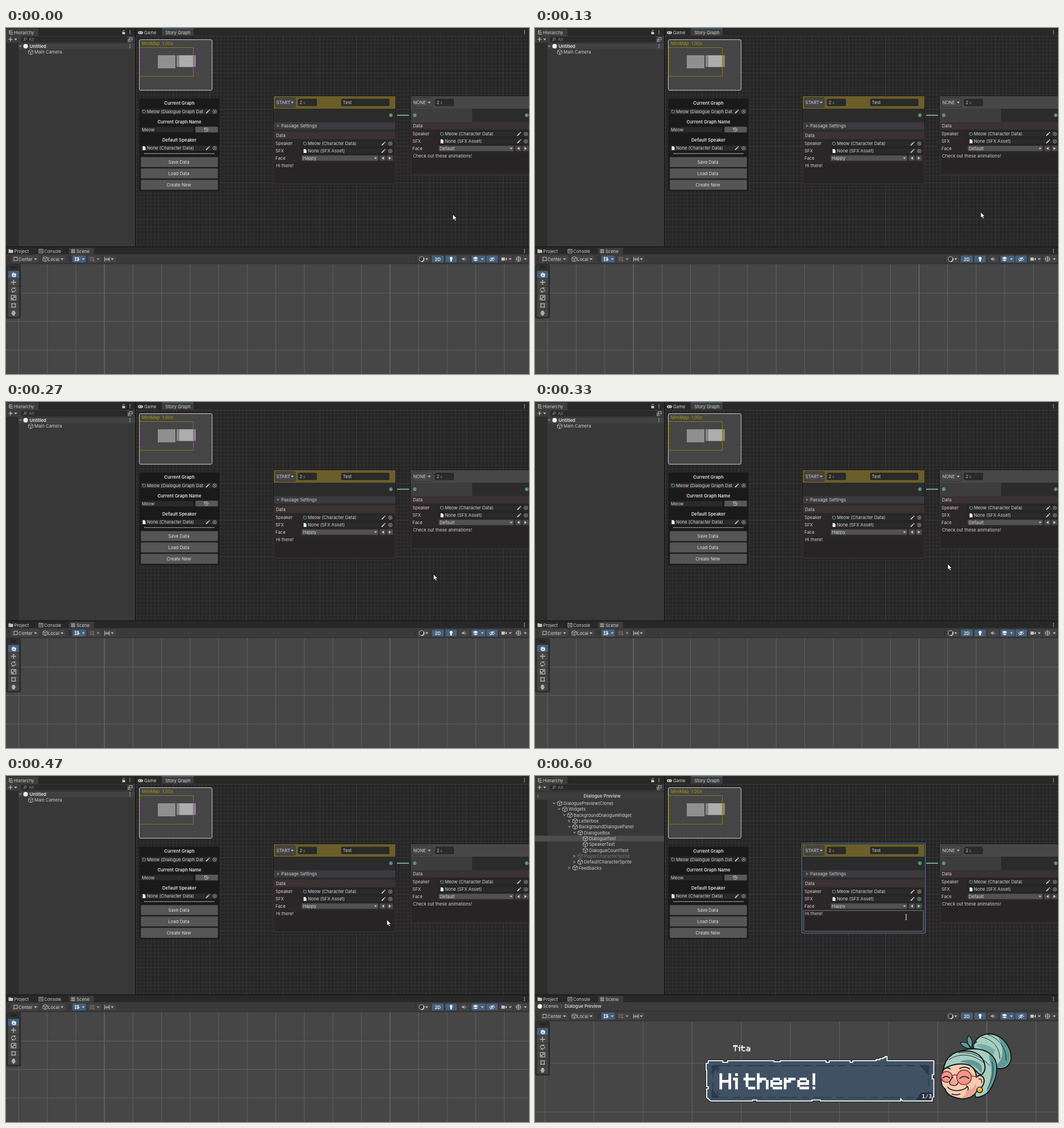
Recreate the animation shown at these times as an HTML page. Size 920 px wide and 609 px high, loop 1470 ms.

```html
<!DOCTYPE html>
<html lang="en">
<head>
<meta charset="utf-8">
<title>Dialogue editor</title>
<style>
html, body { margin: 0; width: 100%; height: 100%; overflow: hidden; background: #191919; }
svg { display: block; width: 100%; height: 100%; font: 7.75px Inter, sans-serif; }
text { white-space: pre; }
</style>
</head>
<body>
<svg id="stage" viewBox="0 0 920 609" xmlns="http://www.w3.org/2000/svg"></svg>
<script>
const INK = '#d0d0d0', BLUE = '#46607c', FIELD = '#2a2a2a', TEAL = '#84e4c8';

const rect = (x, y, w, h, fill, extra = '') =>
  `<rect x="${x}" y="${y}" width="${w}" height="${h}" fill="${fill}" ${extra}/>`;
const path = (d, stroke = INK, w = 1, fill = 'none', extra = '') =>
  `<path d="${d}" stroke="${stroke}" stroke-width="${w}" fill="${fill}" ${extra}/>`;
const dot = (x, y, r, fill, stroke = 'none', w = 1) =>
  `<circle cx="${x}" cy="${y}" r="${r}" fill="${fill}" stroke="${stroke}" stroke-width="${w}"/>`;
const text = (x, y, s, extra = '', fill = INK) =>
  `<text x="${x}" y="${y + 2.8}" fill="${fill}" ${extra}>${s}</text>`;
const group = (id, body, extra = '') => `<g id="${id}" ${extra}>${body}</g>`;
const range = (n, f) => Array.from({ length: n }, (_, i) => f(i)).join('');
const BOLD = 'font-weight="600"', MID = 'text-anchor="middle"';

// Small interface icons
const caret = (x, y, c = '#c4c4c4') => path(`M${x - 2.6} ${y - 1.3}h5.2l-2.6 3z`, 'none', 0, c);
const arrow = (x, y, dir = 1, c = '#c4c4c4') => path(`M${x - 2 * dir} ${y - 2.8}v5.6l${4.2 * dir} -2.8z`, 'none', 0, c);
const kebab = (x, y) => range(3, i => dot(x, y - 2.6 + i * 2.6, .8, '#c4c4c4'));
const cube = (x, y, c = '#c8c8c8') =>
  path(`M${x} ${y - 4.3}l4 2v4.6l-4 2l-4 -2v-4.6zM${x - 4} ${y - 2.3}l4 2l4 -2M${x} ${y - .3}v4.6`, c, .8);
const pencil = (x, y) => path(`M${x - 2.6} ${y + 2.6}l4 -4`, INK, 1.8) +
  path(`M${x + 2} ${y - 2}l1 -1`, INK, 2) + path(`M${x - 3.6} ${y + 3.6}l.6 -2l1.4 1.4z`, 'none', 0, INK);
const picker = (x, y) => dot(x, y, 3, 'none', '#bbb', .8) + dot(x, y, 1.1, '#bbb');
const page = (x, y) => path(`M${x - 2.5} ${y - 3.5}h3l2 2v5h-5z`, 'none', 0, '#eee');
const asset = (x, y) => path(`M${x - 2.6} ${y - 1.5}l2.6 -1.3l2.6 1.3v3l-2.6 1.4l-2.6 -1.4z`, '#4d9fc0', 1) +
  dot(x - 2.3, y - 2, .9, '#d06a50');
const port = (x, y) => dot(x, y, 2.6, '#1d2d29', TEAL, .9) + dot(x, y, 1.2, TEAL);
const button = (x, y, w, h, fill = '#585858') =>
  rect(x, y, w, h, fill, 'rx="1.5" stroke="#262626" stroke-width=".6"');
const field = (x, y, w, h) => rect(x, y, w, h, FIELD, 'rx="1.5" stroke="#1a1a1a" stroke-width=".6"');

function objectField(x, y, w, s, icon) {
  return field(x, y - 5, w, 10) + icon(x + 6, y) + text(x + 11, y, s) +
    pencil(x + w - 18, y) + picker(x + w - 6, y);
}

function hierarchy() {
  const base = rect(0, 0, 227, 385, '#383838') + rect(0, 27, 22, 358, '#2d2d2d') +
    rect(0, 0, 227, 14, '#282828') + rect(0, 1, 57, 13, '#3c3c3c') + rect(0, 14, 227, 12.5, '#3c3c3c') +
    path('M0 26.8H227', '#252525', .7) +
    path('M5 5h6M7 8h5M7 11h5M6 5v6', INK, 1) + text(14, 8, 'Hierarchy') +
    rect(204.5, 7, 5, 4, '#c4c4c4') + path('M205.7 7V5.5a1.5 1.5 0 0 1 3 0', '#c4c4c4', .9) + kebab(218, 7.5) +
    path('M4.5 20h7M8 16.5v7', INK, 1.2) + caret(17, 20) +
    rect(27, 15.5, 186, 9, FIELD, 'rx="3" stroke="#202020" stroke-width=".6"') +
    dot(34, 19.3, 2, 'none', '#aaa', .8) + path('M32.5 21l-2 2', '#aaa', .9) + text(40, 20, 'All', '', '#858585') +
    rect(217, 17, 5, 4, 'none', 'stroke="#c4c4c4" stroke-width=".8"') +
    path('M215 19v5h5M218 19.5l-2 3', '#c4c4c4', .8);

  const idle = rect(22, 27, 205, 10.5, '#414141') + caret(25, 32, '#8a8a8a') + dot(34.5, 32, 4, '#eeeeee') +
    text(41.5, 32, 'Untitled', BOLD, '#e4e4e4') + kebab(218, 32) + cube(43.5, 42.6) + text(50, 42.6, 'Main Camera');

  // depth, state (v open, > closed, - leaf), label
  const rows = [
    [0, 'v', 'DialoguePreview(Clone)'], [1, 'v', 'Widgets'], [2, 'v', 'BackgroundDialogueWidget'],
    [3, '>', 'Letterbox'], [3, 'v', 'BackgroundDialoguePanel'], [4, 'v', 'DialogueBox'],
    [5, '-', 'DialogueText'], [5, '-', 'SpeakerText'], [5, '-', 'DialogueCountText'],
    [4, '>', 'PlayerCharacterSprite'], [4, '>', 'DefaultCharacterSprite'], [3, '>', 'Feedbacks']
  ];
  const tree = rect(0, 27, 227, 16, '#383838') + rect(0, 29.5, 227, 12, '#3c3c3c') + rect(0, 42, 22, 10, '#2d2d2d') +
    path('M7 33l-3 2.5l3 2.5', '#aaa', .9) + text(118, 35.5, 'Dialogue Preview', `${BOLD} ${MID}`) +
    rect(0, 105, 227, 10.3, '#4d4d4d') +
    rows.map(([d, state, label], i) => {
      const x = 50 + d * 9, y = 48.2 + i * 10.32, c = label.startsWith('Player') ? '#777' : INK;
      const mark = state === 'v' ? caret(x - 16.5, y, '#8a8a8a') : state === '>' ? arrow(x - 16.5, y, 1, '#777') : '';
      return mark + cube(x - 6.5, y, c) + text(x, y, label, '', c);
    }).join('');
  return base + group('idleTree', idle) + group('openTree', tree);
}

function miniMap() {
  return rect(234.5, 20.5, 128, 89, '#4a4a4a', 'rx="2.5" fill-opacity=".85" stroke="#c8c8c8" stroke-width="1"') +
    text(239, 27.5, 'MiniMap  1.00x', '', '#a39c10') +
    rect(267, 48, 31, 23, '#8f8f8f') + rect(300, 48, 34, 20.5, '#858585') + rect(305, 48, 24.5, 20.5, '#adadad') +
    rect(235, 34.5, 94.5, 50.5, 'none', 'stroke="#858212" stroke-width=".9"');
}

function graphPanel() {
  const big = (y, s) => button(237, y, 136, 18, '#555') + text(304, y + 9, s, MID, '#e0e0e0');
  const head = (y, s) => text(305, y, s, `${BOLD} ${MID}`, '#e0e0e0');
  return rect(234.5, 124, 141, 163, '#1a1a1a', 'rx="2"') + head(132.5, 'Current Graph') +
    objectField(237, 147, 136, 'Meow (Dialogue Graph Dat', asset) + head(165, 'Current Graph Name') +
    field(237, 174, 93, 10) + text(239, 179, 'Meow') + button(333, 173.5, 40, 10.5) +
    path('M349.5 177a3.3 3.3 0 1 1 -.4 3M349 175.5v2.5h2.5M352.5 177v2.3h1.8', INK, .9) +
    head(197.5, 'Default Speaker') + objectField(237, 211.5, 136, 'None (Character Data)', page) +
    path('M243 221H367', '#ddd', 1, 'none', 'stroke-dasharray="2.2 .6"') +
    big(227, 'Save Data') + big(247, 'Load Data') + big(267, 'Create New');
}

function dataBox(x, y, w, face, line) {
  const fx = x + 49, end = x + w;
  return rect(x, y, w, 92, '#2b2728', 'stroke="#48393b" stroke-width=".8"') +
    rect(x + .5, y + .5, w - 1, 12, '#3b3234') + text(x + 4, y + 6.5, 'Data') +
    text(x + 3, y + 20.5, 'Speaker') + objectField(fx, y + 20.5, w - 52, 'Meow (Character Data)', asset) +
    text(x + 3, y + 33.5, 'SFX') + objectField(fx, y + 33.5, w - 52, 'None (SFX Asset)', page) +
    text(x + 3, y + 46.5, 'Face') + button(fx, y + 41, w - 79, 10, '#515151') + text(fx + 2, y + 46, face) +
    caret(end - 35, y + 46) + button(end - 28, y + 41, 11.5, 10, '#484848') + button(end - 15.5, y + 41, 11.5, 10, '#484848') +
    arrow(end - 22, y + 46, -1) + arrow(end - 9.5, y + 46) +
    rect(x + 2, y + 54, w - 4, 36, '#272425') + text(x + 4, y + 59.5, line);
}

function nodes() {
  const title = (x, kind) => button(x + 3, 122.5, 35, 17, '#464646') + text(x + 4.5, 131, kind) + caret(x + 32.5, 131) +
    field(x + 43, 125, 32.5, 12) + text(x + 45.5, 131, '2') + text(x + 52, 131, 's', 'font-size="6.5"', '#8a8a8a');
  return group('start',
    rect(470.5, 119.5, 215, 157, '#2b2b2b', 'rx="2" stroke="#1c1c1c"') + rect(471, 120, 214, 22, '#6a5e2b') +
    title(471, 'START') + field(590, 125, 84, 12) + text(592.5, 131, 'Test') + port(677, 153.5) +
    rect(471, 166, 214, 12.5, '#3d3a3f') + arrow(479, 172, 1, '#777') + text(484, 172, 'Passage Settings') +
    dataBox(471, 183, 214, 'Happy', 'Hi there!')) +
    rect(711.5, 119.5, 213, 139, '#2b2b2b', 'rx="2" stroke="#1c1c1c"') + rect(712, 120, 212, 22, '#474747') +
    rect(712, 142, 108, 24, '#3d3d3d') + title(712, 'NONE') + port(719, 153.5) + port(916, 153.5) +
    dataBox(712, 166, 211.5, 'Default', 'Check out these animations!') +
    path('M688 153.5H709', '#a5e6d6', 1.3) +
    group('focus',
      rect(469.5, 118.3, 217, 158.4, 'none', 'rx="3" stroke="#457f9f" stroke-width="1.1"') +
      rect(472.8, 236.8, 210.4, 36.4, 'none', 'rx="1.5" stroke="#858585" stroke-width=".9"'));
}

function graph() {
  return rect(229, 0, 691, 14, '#282828') + rect(229, 13, 691, 372, '#262626') +
    rect(229, 13, 691, 372, 'url(#fine)') + rect(229, 13, 691, 372, 'url(#coarse)') +
    rect(274, 0, 56, 13, '#3f3f3f') + rect(274, 0, 56, .9, '#3a6a95') +
    rect(232, 5.8, 9, 5, '#c8c8c8', 'rx="2.4"') + path('M233.5 8.3h2.6M234.8 7v2.6', '#333', .7) +
    dot(238.5, 8.3, .8, '#333') + text(243, 8, 'Game') + text(280.5, 8, 'Story Graph') + kebab(912, 7.5) +
    miniMap() + graphPanel() + nodes();
}

// Pixel lettering as strokes on a unit grid: [advance, path]
const GLYPHS = {
  H: [6, 'M0 0V6M4 0V6M0 3H4'], T: [6, 'M0 1V0H4V1M2 0V6'], '!': [2, 'M.8 0V4M.8 6v.01'],
  i: [3, 'M1 0v.01M0 2H1V6'], t: [6, 'M0 2H4M1 0V5M2 6H4'], h: [6, 'M0 0V6M0 3H1M1 2H3M4 3V6'],
  e: [6, 'M1 2H3M0 3V5M4 3V4H0M1 6H4'], r: [6, 'M0 2V6M1 3H2M2 2H4'],
  a: [6, 'M1 2H3M4 3V6M1 4H4M0 5v.01M1 6H4'], ' ': [1.7, '']
};
function pixelText(x, y, unit, s) {
  let at = 0;
  const body = [...s].map(c => {
    const [adv, d] = GLYPHS[c], g = `<path d="${d}" transform="translate(${at})"/>`;
    at += adv;
    return g;
  }).join('');
  return `<g role="img" aria-label="${s}" fill="none" stroke="#fff" stroke-width="1.2" stroke-linecap="square"
    transform="translate(${x + unit / 2} ${y + unit / 2}) scale(${unit})">${body}</g>`;
}

function speechBox() {
  const edge = 'M290 492H318v3h9v-3H416v2h12v-2H516v3h6v-3H562v3h5v-3H612v-2h7v-2h6v-2h4v-2h4v8H722.5V519h-3v8h3V562' +
    'h-3v7.5H663l-4 -4v4H505v-2h-16v2H383v-2h-8v2H295l-8 -7V546h3v-4h-3V510h-1V497h4z';
  return path(edge, '#11181f', 4, '#11181f') + path(edge, '#fff', 2, '#405163') +
    path('M299 501.5H712V562.5H299z', '#2a3948', 1.5, 'none', 'stroke-dasharray="34 7 16 9"') +
    path('M297 517V502H312zM697 502H712V519zM297 548V562H311z', '#263341', 1, '#2c3b4a') +
    path('M308 514V508h6M702 508h4v8M308 549v6h6', '#2a3948', 1.5) +
    path('M689 567l9 -14h22v9l-3 5z', 'none', 0, '#27323f') +
    pixelText(312, 516.5, 4.3, 'Hi there!') + pixelText(338, 462.5, 1.62, 'Tita') +
    text(699.5, 561, '1/3', 'style="font:bold 9.8px \'DejaVu Sans Mono\',monospace" letter-spacing=".7"', '#fff');
}

function portrait() {
  const line = '#0e171c', light = '#a6cdbf', dark = '#5d9a98', skin = '#f8cbb0';
  const shape = (d, fill, w = 2.2) => path(d, line, w, fill, 'stroke-linejoin="round" stroke-linecap="round"');
  const flat = (d, fill) => path(d, 'none', 0, fill);
  return shape('M798 468C799 449 816 439 834 441C858 445 873 471 870 491C866 507 850 511 838 504C832 484 820 474 798 468Z', light) +
    flat('M845 446C866 458 872 480 866 496C857 507 847 508 840 502C857 492 858 466 845 446Z', dark) +
    flat('M803 463C812 457 826 460 840 472C836 482 834 488 835 493C828 478 817 470 803 463Z', '#78aea6') +
    shape('M815 447C835 451 849 466 849 488M826 442C845 448 862 466 861 491', 'none', 1) +
    shape('M794 469C783 469 775 463 773 457C782 455 790 459 794 469C785 458 785 449 789 444C797 450 798 459 794 469C797 461 801 457 805 456', dark, 1.5) +
    shape('M752 496C757 478 777 469 800 469C827 470 843 485 843 505C843 523 838 534 831 546C825 557 812 563 802 562L798 512Z', light) +
    flat('M829 489C835 504 834 524 823 553C835 543 842 524 841 503C840 492 836 484 829 480Z', dark) +
    shape('M741 509C752 498 772 495 788 499C799 504 804 514 804 524C810 517 819 521 819 531C818 541 811 547 806 548C801 559 790 566 774 565C757 562 747 557 744 546C735 540 734 524 741 509Z', skin) +
    flat('M785 547C795 549 801 543 803 535L805 548C800 558 788 565 774 564C782 560 786 554 785 547Z', '#e8a68d') +
    shape('M741 509C743 494 751 482 765 476C790 469 812 476 819 495C823 508 819 515 814 519C806 519 804 508 790 500C773 496 754 499 741 509Z', light) +
    flat('M772 494C784 488 800 489 811 498C816 505 816 512 813 516C807 506 797 498 772 494Z', dark) +
    shape('M752 490C772 476 798 479 818 496M770 477C790 474 811 481 829 501M834 494C839 510 835 530 825 546', 'none', 1) +
    shape('M742 508C746 505 750 505 754 508M772 507C779 503 786 504 791 508', 'none', 1.9) +
    dot(747, 523, 10.5, '#f5958a', '#8e3439', 1.8) + dot(780.5, 524, 14, '#f5958a', '#8e3439', 1.8) +
    path('M758 521Q762 517 767 521M794 521L808 523', '#8e3439', 1.7) +
    shape('M740 525Q746 519 753 525M772 526Q780 519 790 526', 'none', 1.7) +
    shape('M759 523C752 532 750 537 757 539C762 541 768 539 769 534', '#f0a78e', 1.5) +
    shape('M749 543C756 551 774 552 786 543M785 540Q790 543 788 548M757 556Q765 559 773 556M809 527Q815 526 814 534', 'none', 1.6) +
    dot(810.5, 548, 5.5, '#f5a62b', line, 1.5) + dot(809, 546, 1.8, '#ffe08a');
}

function sceneGrid(x0, n, step, ys, bold) {
  const thin = 'vector-effect="non-scaling-stroke"';
  return range(n, i => path(`M${x0 + i * step} 400V640`, i % 10 === bold ? '#787878' : '#606060', 1, 'none', thin)) +
    ys.map(y => path(`M-60 ${y}H980`, '#606060', 1, 'none', thin)).join('');
}

function sceneBar() {
  const on = (x, w) => rect(x, 400.5, w, 12, BLUE, 'rx="1.5"');
  const off = (x, w) => rect(x, 400.5, w, 12, '#434343', 'rx="1.5"');
  const y = 406.7, hash = (x, c) => path(`M${x - 4} ${y - 2}h8M${x - 4} ${y + 2}h8M${x - 2} ${y - 4}v8M${x + 2} ${y - 4}v8`, c, .9);
  const tool = i => rect(3.5, 427.5 + i * 13.6, 19.5, 12.8, i ? '#454545' : BLUE, 'rx="1"');
  const mark = (i, d) => path(d, '#d0d0d0', 1, 'none', `transform="translate(13.3 ${433.9 + i * 13.6})"`);
  return rect(0, 398, 920, 17, '#3a3a3a') + path('M0 415H920', '#262626', .8) +
    path('M3 402v9M5 402v9', '#2a2a2a', .8) + off(10, 48) + off(63, 41) +
    rect(14, 403.5, 6, 6, 'none', 'stroke="#c4c4c4" stroke-width=".9"') + dot(14, 409.5, 1.4, '#d06a50') +
    text(22, y, 'Center') + caret(52, y) + cube(69, y) + text(74, y, 'Local') + caret(98.5, y) +
    path('M111 402v9M113 402v9M721 402v9', '#2a2a2a', .8) +
    on(117, 23.5) + off(144, 23) + off(171, 22) + hash(124.5, '#fff') + path('M126 405l4 3h-4z', 'none', 0, '#fff') +
    caret(136, y) + hash(151, '#777') + dot(154, 409, 1.6, '#a65a48') + caret(162, y, '#999') +
    path('M173.5 403v8M182 403v8M174 407h8M176.5 404.5v5M179.5 404.5v5', '#bbb', 1) + caret(187, y) +
    off(724, 22) + dot(731, y, 4.2, '#333', '#c8c8c8', .9) + path('M731 411a4.2 4.2 0 0 0 3.6 -6.3', '#c8c8c8', 2) + caret(740, y) +
    on(749, 21) + text(759.5, y, '2D', `${MID} ${BOLD}`, '#eee') + on(773, 20) + dot(783, 405.3, 2.5, '#fff') +
    rect(781.7, 407, 2.6, 4, '#fff') + off(796, 20) + path('M802 405.3h2l2.5 -2v6.6l-2.5 -2h-2z', 'none', 0, '#aaa') +
    path('M808 405q2 2 0 4', '#aaa', .9) + on(819, 24.5) +
    path('M822 405l4 -2l4 2l-4 2zM822 408l4 2l4 -2', '#eee', 1, '#eee') + caret(838, y) +
    on(845, 20) + path('M850.5 407q4.5 -5 9 0q-4.5 5 -9 0zM851 411l8 -8', '#eee', 1) + dot(855, y, 1.4, '#eee') +
    off(868, 23) + rect(871.5, 404, 6, 5.5, '#c4c4c4') + path('M878 406.7l3 -2.5v5z', 'none', 0, '#c4c4c4') + caret(887, y) +
    off(894, 24) + dot(901.5, y, 4, 'none', '#c4c4c4', .9) + path('M897 406.7h9M901.5 402v9', '#c4c4c4', .9) + caret(913.5, y) +
    rect(1, 416.5, 24.5, 94, '#303030', 'rx="2" stroke="#1e1e1e" stroke-width=".8"') +
    path('M8 420.3h11M8 422.6h11', '#171717', 1) + range(6, tool) +
    path('M-3 0l2 3h4l1 -5M-2 1v-4M0 1v-5M2 1v-4', '#fff', 1.5, 'none', 'transform="translate(13.3 434.5)"') +
    mark(1, 'M-4 0H4M0 -4V4M-3 -1l-1 1l1 1M3 -1l1 1l-1 1M-1 -3l1 -1l1 1M-1 3l1 1l1 -1') +
    mark(2, 'M-3.5 1A3.6 3.6 0 0 1 2 -3M3.5 -1A3.6 3.6 0 0 1 -2 3M2.5 -4.5V-2.5H0M-2.5 4.5V2.5H0') +
    mark(3, 'M-4 -4H4V4H-4zM-2 2L2 -2M0 -2H2V0M-4 1H-1V4') +
    mark(4, 'M-3 -3H3V3H-3zM-4 -3h2M2 -3h2M-4 3h2M2 3h2') +
    mark(5, 'M-4 0H4M0 -4V4M-2.6 -2.6A3.7 3.7 0 0 1 2.6 -2.6M-2.6 2.6A3.7 3.7 0 0 0 2.6 2.6M-2 -2H2V2H-2z');
}

function sceneTabs() {
  return rect(0, 384.5, 920, 14, '#282828') + path('M0 385.2H920', '#191919', 1.4) + rect(111, 387, 44, 12, '#3c3c3c') +
    path('M4.5 389.5h3l1 1h4v5.5h-8z', 'none', 0, '#c4c4c4') + text(14.5, 392.8, 'Project') +
    rect(58, 389.5, 7, 6.5, 'none', 'stroke="#c4c4c4" stroke-width=".9"') + path('M59.5 391.5h4M59.5 393.5h4', '#c4c4c4', .8) +
    text(67, 392.8, 'Console') + path('M114 391h8M114 394.5h8M116.5 389v8M119.5 389v8', '#c4c4c4', .9) +
    text(124, 392.8, 'Scene') + kebab(912, 392.5);
}

const crumbs = () => rect(0, 398, 920, 16, '#3c3c3c') + path('M0 413.7H920', '#2a2a2a', .8) + dot(8.5, 405.5, 4, '#eeeeee') +
  text(14, 405.5, 'Scenes') + path('M46.5 402v7', '#777', .8) + text(52, 405.5, 'Dialogue Preview', BOLD);

const gridPattern = (id, step, alpha) => `<pattern id="${id}" x="229" y="14" width="${step}" height="${step}"
  patternUnits="userSpaceOnUse">${path(`M0 .4H${step}M.4 0V${step}`, `rgba(200,200,200,${alpha})`, .8)}</pattern>`;

document.getElementById('stage').innerHTML =
  `<defs>${gridPattern('fine', 6.45, .085)}${gridPattern('coarse', 64.5, .09)}</defs>` +
  rect(0, 0, 920, 609, '#191919') + rect(0, 398, 920, 211, '#464646') +
  group('emptyScene', sceneGrid(22.3, 18, 50.25, [466.5, 516.5, 566.8], 3)) +
  group('preview', sceneGrid(-23.2, 11, 94.15, [497, 590.5], 9) + speechBox() + portrait()) +
  hierarchy() + graph() + rect(227, 0, 2, 385, '#191919') + sceneTabs() +
  group('crumbs', crumbs()) + group('sceneBar', sceneBar()) +
  group('pointer', path('M0 0V10.2L2.4 8.1L4 11.7L5.9 10.9L4.3 7.4H7.4Z', '#111', .8, '#fff')) +
  group('beam', path('M650.8 243.5q2 0 2 1.4v7q0 1.4 -2 1.4M654.8 243.5q-2 0 -2 1.4v7q0 1.4 2 1.4', '#111', 1.8) +
    path('M650.8 243.5q2 0 2 1.4v7q0 1.4 -2 1.4M654.8 243.5q-2 0 -2 1.4v7q0 1.4 2 1.4', '#ddd', .8));

const LOOP = 1470, OPEN = 530, SETTLED = 600;
// start time, pointer tip
const STOPS = [[0, 786, 328], [70, 786, 327], [130, 784, 324], [200, 772, 316], [270, 752, 303],
  [330, 726, 285], [400, 696, 263.5], [470, 670, 253], [530, 651.5, 247.5]];
const el = id => document.getElementById(id);
const show = (on, ...ids) => ids.forEach(id => el(id).setAttribute('display', on ? 'inline' : 'none'));
const move = (id, value) => el(id).setAttribute('transform', value);

function update(now) {
  const t = now % LOOP, open = t >= OPEN, settled = t >= SETTLED;
  const [, x, y] = STOPS.filter(s => s[0] <= t).pop();
  show(!open, 'idleTree', 'emptyScene');
  show(open, 'openTree', 'preview', 'focus');
  show(settled, 'crumbs', 'beam');
  show(!settled, 'pointer');
  move('pointer', `translate(${x} ${y})`);
  move('sceneBar', `translate(0 ${settled ? 16 : 0})`);
  move('preview', settled ? 'translate(38.6 49.6) scale(.9176)' : '');
}

const begin = performance.now();
function tick() {
  update(performance.now() - begin);
  requestAnimationFrame(tick);
}
tick();
</script>
</body>
</html>
```
